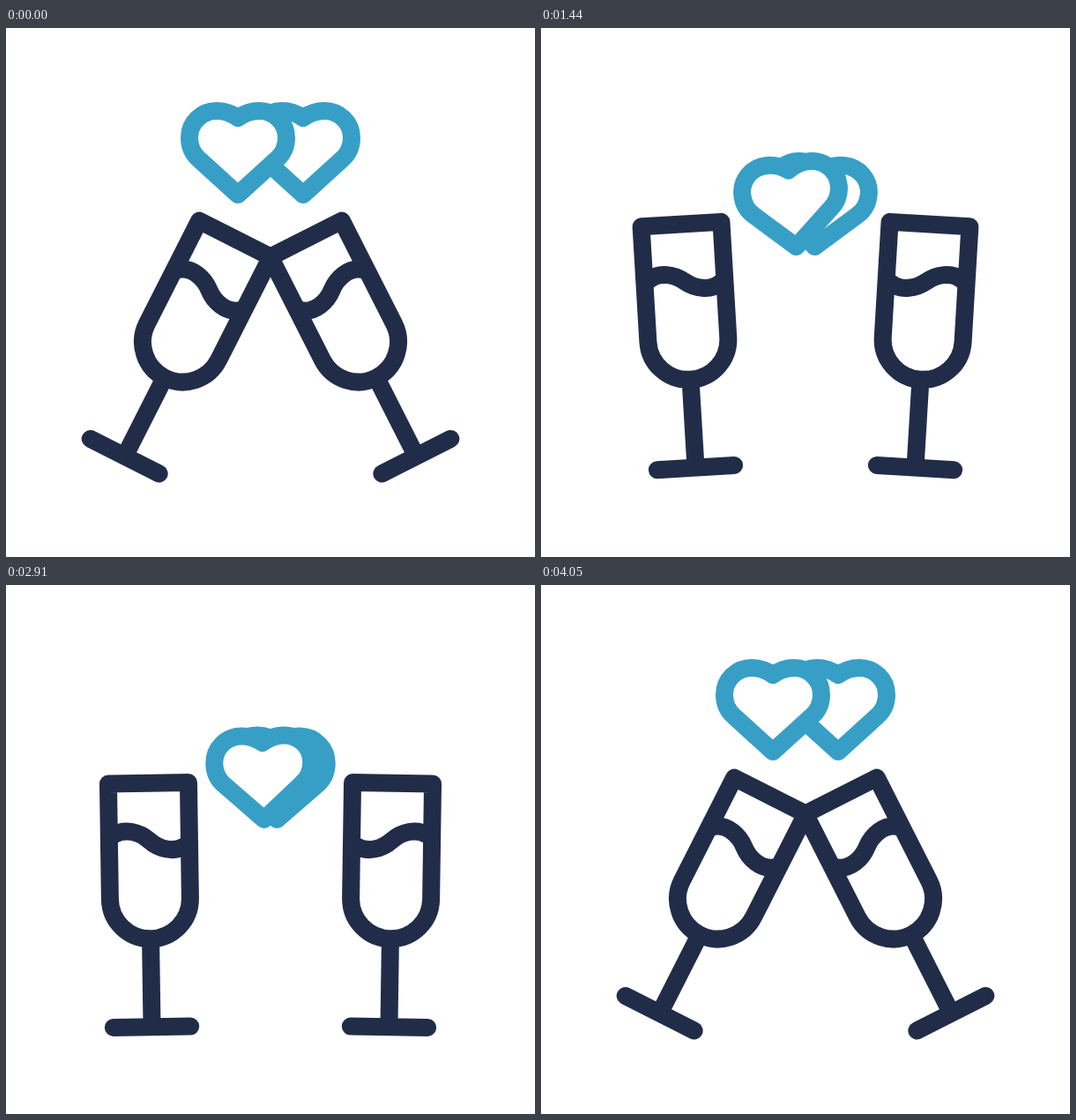
Write an HTML page that moves like this. It is 600x600 px and loops after 4500 ms.

```html
<!DOCTYPE html>
<html lang="en">
<head>
<meta charset="utf-8">
<title>Cheers</title>
<style>
  html, body { margin: 0; width: 100%; height: 100%; overflow: hidden; background: #fff; }
  svg { display: block; width: 100%; height: 100%; }
  .line { fill: none; stroke-width: 20; stroke-linecap: round; stroke-linejoin: round; }
  .dark { stroke: #212d48; }
  .blue { stroke: #379fc6; }
  .heart { fill: #fff; vector-effect: non-scaling-stroke; }
</style>
</head>
<body>
<svg viewBox="0 0 600 600">
  <defs>
    <g id="glass" class="line dark">
      <path d="M-45.5-276.5H45.5V-145.5A45.5 45.5 0 0 1-45.5-145.5ZM0-100V0M-43.7 0H43.7"/>
      <path id="wave"/>
    </g>
    <path id="heart" d="M0-87C-7-92-16-95-24-95C-41-95-55-82-55-64.5C-55-55-51-46-44-40L0 0L44-40C51-46 55-55 55-64.5C55-82 41-95 24-95C16-95 7-92 0-87Z"/>
    <path id="ray"/>
  </defs>
  <g id="rays" class="line blue">
    <use href="#ray" transform="translate(300 147.5)"/>
    <use href="#ray" transform="translate(260 154.5) rotate(-28)"/>
    <use href="#ray" transform="translate(340 154.5) rotate(28)"/>
  </g>
  <g transform="matrix(-1 0 0 1 600 0)"><use href="#heart" class="line blue heart side-heart"/></g>
  <use href="#heart" class="line blue heart side-heart"/>
  <use href="#glass" class="side-glass"/>
  <g transform="matrix(-1 0 0 1 600 0)"><use href="#glass" class="side-glass"/></g>
</svg>
<script>
const LOOP = 4500, STEP = 30;
const $ = id => document.getElementById(id);
const hearts = document.querySelectorAll('.side-heart');
const glasses = document.querySelectorAll('.side-glass');
const wave = $('wave'), ray = $('ray'), rays = $('rays');

const clamp = v => Math.max(0, Math.min(1, v));
const ease = (t, a, b) => { const p = clamp((t - a) / (b - a)); return p * p * (3 - 2 * p); };
const place = (nodes, transform) => nodes.forEach(n => n.setAttribute('transform', transform));

// The glass hops while it swings around a point on its stem.
function drawGlasses(up, apart, back) {
  const hop = up - apart;
  const tilt = 26.9 - 14.5 * up - 20.1 * apart + 34.6 * back;
  place(glasses, `translate(${181.5 + 32 * hop} ${431 - 15.5 * hop}) rotate(${tilt}) translate(-17 70)`);
}

// The hearts rise, fall together into one that beats, then spring apart.
function drawHearts(t, up, meet, back) {
  const x = 263 + 37 * (meet - back);
  const y = 189 - 35 * up + 131 * meet - 96 * back;
  const spring = ease(t, 2700, 3600) - ease(t, 3600, 4040);
  const turn = -20.7 * (up - meet) - 9 * spring;
  const beat = 1 + 0.085 * Math.sin(Math.PI * clamp((t - 1650) / 600));
  place(hearts, `translate(${x} ${y}) rotate(${turn}) translate(0 -47) scale(${beat}) translate(0 47)`);
}

function drawWave(t, up) {
  const slosh = ease(t, 1080, 1900) - ease(t, 1900, 2460) / 2;
  const splash = ease(t, 2800, 3480) - ease(t, 3480, 4040);
  const a = 9.5 - 7.5 * up * (1 - ease(t, 2460, 2900)) + 16 * slosh - 8 * ease(t, 2460, 2900) + 8 * splash;
  const end = 1.78 * a - 11;
  const ctl = (5 * a - end) / 3;
  wave.setAttribute('d',
    `M-40 ${-211.5 - end}c12 ${end - ctl} 29 ${end - a} 40 ${end}` +
    `c11 ${a} 28 ${ctl} 40 ${end}`);
}

function drawRays(t) {
  const head = 2 + 48 * ease(t, 1720, 2600);
  const tail = 49.9 * ease(t, 2000, 2640);
  const width = 20 * Math.min(clamp((t - 1700) / 90), clamp((2640 - t) / 150));
  rays.style.display = width > 0 ? '' : 'none';
  rays.style.strokeWidth = width;
  ray.setAttribute('d', `M0 ${-tail}V${-Math.max(head, tail + 0.1)}`);
}

function draw(t) {
  const up = ease(t, 310, 1020);
  const back = ease(t, 2690, 3460);
  drawGlasses(up, ease(t, 1015, 1620), back);
  drawHearts(t, up, ease(t, 1050, 1650), back);
  drawWave(t, up);
  drawRays(t);
}

const start = performance.now();
function frame() {
  const t = (performance.now() - start) % LOOP;
  draw(Math.floor(t / STEP) * STEP);
  requestAnimationFrame(frame);
}
draw(0);
requestAnimationFrame(frame);
</script>
</body>
</html>
```
